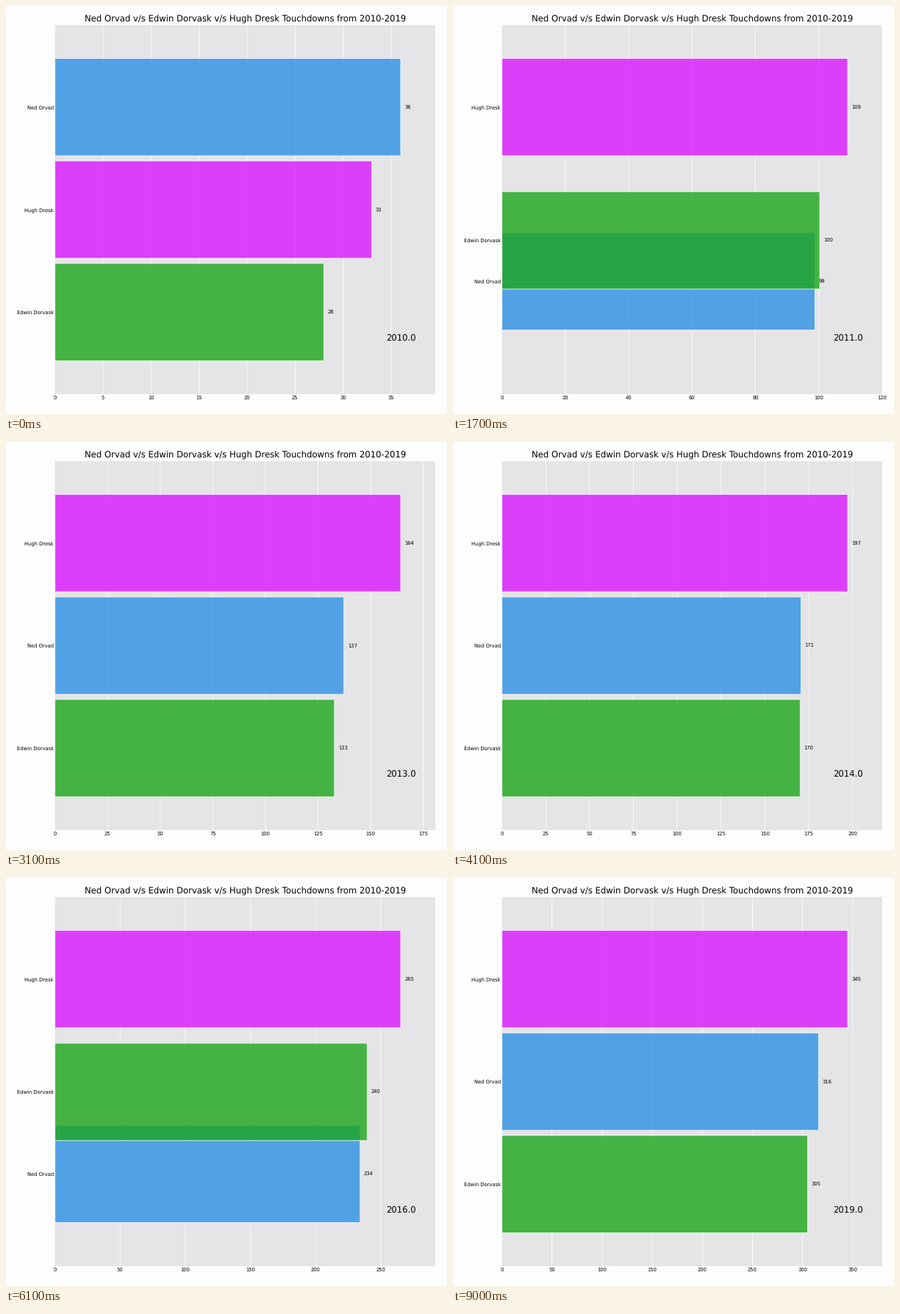
A matplotlib script that plays this animation: 600 by 556 pixels, repeating every 9.1 s.

```python
import matplotlib.pyplot as plt
import numpy as np
from matplotlib.animation import FuncAnimation

DPI = 64
W, H = 600, 556
STEPS = 10
FIRST_YEAR = 2010
BAR_H = 0.95

NAMES = ["Ned Orvad", "Edwin Dorvask", "Hugh Dresk"]
COLORS = ["#2E91E5", "#1CA71C", "#DA16FF"]
YEARLY = np.array([
    [36, 39, 34, 25, 33, 36, 28, 32, 29, 24],
    [28, 45, 39, 17, 38, 31, 40, 16, 25, 26],
    [33, 46, 43, 39, 33, 32, 37, 23, 32, 27],
])

totals = YEARLY.cumsum(axis=1)
# Highest total gets the top slot; ties go to the earlier name.
order = np.argsort(-totals, axis=0, kind="stable")
slots = len(NAMES) - np.argsort(order, axis=0)
N_FRAMES = (totals.shape[1] - 1) * STEPS + 1


def pt(px):
    return px * 72 / DPI


def lerp(table, i):
    year, k = divmod(i, STEPS)
    nxt = min(year + 1, table.shape[1] - 1)
    return (table[:, year] * (STEPS - k) + table[:, nxt] * k) / STEPS


# Unsnapped lines and unhinted text keep sub-pixel positions.
plt.rcParams.update({
    "font.family": "DejaVu Sans",
    "path.snap": False,
    "text.hinting": "no_hinting",
})
SMALL, LARGE = pt(6.78), pt(11.62)
LEFT, RIGHT = 66.6, 584
PAD = 1.94

fig = plt.figure(figsize=(W / DPI, H / DPI), dpi=DPI, facecolor="#fefdfe")
ax = fig.add_axes([LEFT / W, 27 / H, (RIGHT - LEFT) / W, 503 / H],
                  facecolor="#e5e4e6")
ax.set_ylim(0.2, len(NAMES) + 0.8)
ax.set_axisbelow(True)
ax.grid(True, axis="x", color="white", linewidth=pt(0.8))
ax.tick_params(labelsize=SMALL, length=0, pad=pt(PAD))
ax.spines[:].set_visible(False)
ax.xaxis.set_major_formatter("{x:,.0f}")
ax.set_title(
    f"{NAMES[0]} v/s {NAMES[1]} v/s {NAMES[2]} Touchdowns from 2010-2019",
    fontsize=LARGE, pad=pt(5.8),
)

bars = ax.barh(slots[:, 0], totals[:, 0], height=BAR_H, color=COLORS,
               ec="white", lw=pt(0.97), alpha=0.8)
ax.set_yticks([])
names = [ax.text(-PAD / (RIGHT - LEFT), 0, name, fontsize=SMALL, ha="right",
                 va="center_baseline", transform=ax.get_yaxis_transform())
         for name in NAMES]
values = [ax.text(0, 0, "", fontsize=SMALL, ha="left", va="center")
          for _ in NAMES]
period = ax.text(0.95, 0.15, "", transform=ax.transAxes, fontsize=LARGE,
                 ha="right", va="center")


def update(i):
    lengths, ys = lerp(totals, i), lerp(slots, i)
    x_max = lengths.max() * 1.1
    ax.set_xlim(0, x_max)
    for bar, name, value, length, y in zip(bars, names, values, lengths, ys):
        bar.set_width(length)
        bar.set_y(y - BAR_H / 2)
        name.set_y(y)
        value.set_position((length + 0.01 * x_max, y))
        value.set_text(f"{length:,.0f}")
    period.set_text(f"{FIRST_YEAR + i // STEPS:.1f}")
    return [*bars, *names, *values, period]


anim = FuncAnimation(fig, update, frames=N_FRAMES, interval=100,
                     repeat=True, repeat_delay=0, blit=False)
plt.show()
```
